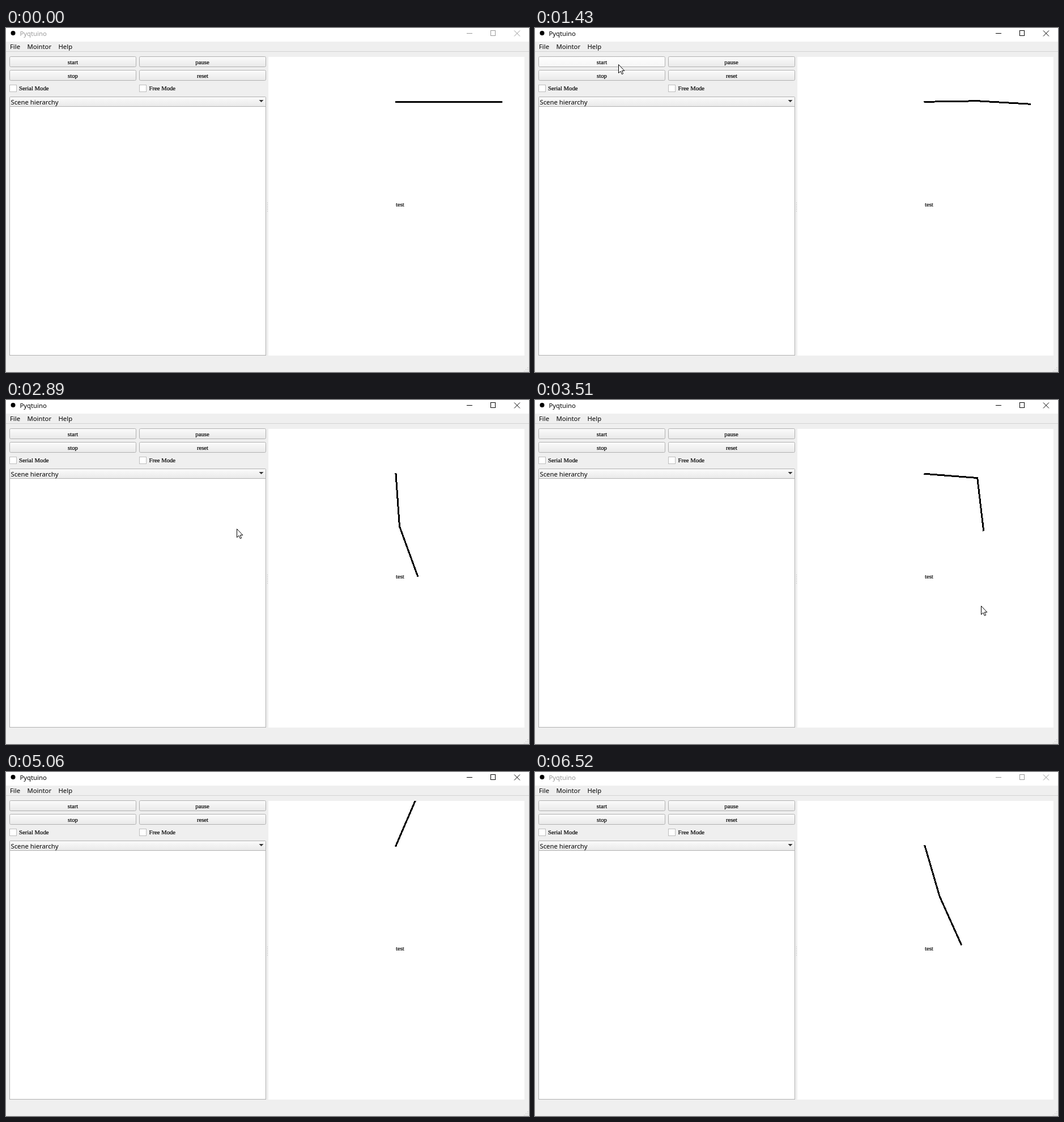
Write an HTML page that moves like this. It is 923 px wide and 607 px high and loops after 6590 ms.

```html
<!DOCTYPE html>
<html lang="en">
<head>
<meta charset="utf-8">
<title>Pyqtuino</title>
<style>
  html, body { margin: 0; width: 100%; height: 100%; overflow: hidden; background: #efefef; }
  svg { display: block; width: 923px; height: 607px; }
  .ui { font: 11.3px "Noto Sans", "Open Sans", sans-serif; }
  .serif { font: 10.7px "Liberation Serif", "Noto Serif", serif; stroke: #000; stroke-width: .2; }
  .mid { text-anchor: middle; }
  .box { stroke: #b0b0b0; }
  .crisp { shape-rendering: crispEdges; }
  #chrome { --ink: #000; }
  #chrome.idle { --ink: #999; }
  #chrome text { fill: var(--ink); }
  #chrome path { fill: none; stroke: var(--ink); }
</style>
</head>
<body>
<svg viewBox="0 0 923 607">
  <defs>
    <linearGradient id="face" x2="0" y2="1">
      <stop stop-color="#fbfbfb"/><stop offset="1" stop-color="#e9e9e9"/>
    </linearGradient>
    <linearGradient id="hover" x2="0" y2="1">
      <stop stop-color="#fff"/><stop offset="1" stop-color="#f5f5f5"/>
    </linearGradient>
    <clipPath id="view"><rect x="463" y="51" width="452" height="527"/></clipPath>
  </defs>

  <rect width="923" height="607" fill="#efefef"/>
  <rect width="923" height="24" fill="#fff"/>
  <circle cx="12.5" cy="9" r="4"/>
  <g id="chrome" class="ui">
    <text x="24.5" y="14">Pyqtuino</text>
    <path class="crisp" d="M813 9.5h10M855.5 4.5h8v9h-8z"/>
    <path d="M897 4.5l10 10M907 4.5l-10 10"/>
  </g>
  <g class="ui">
    <text x="7" y="37">File</text>
    <text x="37.5" y="37">Mointor</text>
    <text x="92.5" y="37">Help</text>
  </g>
  <path class="crisp" d="M0 41.5h923" stroke="#d2d2d2"/>

  <g class="box" fill="url(#face)">
    <rect id="start" x="6.5" y="50.5" width="223" height="18" rx="2"/>
    <rect x="235.5" y="50.5" width="223" height="18" rx="2"/>
    <rect x="6.5" y="74.5" width="223" height="18" rx="2"/>
    <rect x="235.5" y="74.5" width="223" height="18" rx="2"/>
    <rect x="6.5" y="121.5" width="452" height="17" rx="1"/>
    <g fill="#fff">
      <rect x="6.5" y="100.5" width="12" height="12" stroke="#bdbdbd"/>
      <rect x="235.5" y="100.5" width="12" height="12" stroke="#bdbdbd"/>
      <rect x="6.5" y="138.5" width="452" height="439"/>
    </g>
  </g>
  <g class="serif">
    <g class="mid">
      <text x="118" y="63.5">start</text>
      <text x="346.5" y="63.5">pause</text>
      <text x="118" y="87.5">stop</text>
      <text x="347" y="87.5">reset</text>
    </g>
    <text x="23" y="110">Serial Mode</text>
    <text x="252.5" y="110">Free Mode</text>
  </g>
  <text class="ui" x="8.5" y="134.5">Scene hierarchy</text>
  <path d="M446.5 127h8l-4 4z" fill="#333"/>
  <path d="M461.5 308v16" stroke="#bbb" stroke-dasharray="1 2"/>
  <path d="M914 605.5h8M917 602.5h5M920 599.5h2" stroke="#c4c4c4" stroke-dasharray="1.5 1.5"/>

  <rect x="463" y="51" width="452" height="527" fill="#fff"/>
  <text class="serif" x="688" y="314.5">test</text>
  <g clip-path="url(#view)">
    <path id="arms" class="crisp" fill="none" stroke="#000" stroke-width="3"
          stroke-linejoin="round" stroke-linecap="square"/>
  </g>
  <path id="pointer" d="M.5 .5V15.5L4 12.3 6.4 17.6 8.6 16.6 6.3 11.4H10.8Z" fill="#fff" stroke="#000"/>
</svg>
<script>
  const LOOP = 6590, STEP = 77.07, LEN = 93, PIVOT = [688, 130.3];
  const PRESS = 17, RELEASE = 19, LEAVE = 33, BLUR = 85;
  const el = id => document.getElementById(id);

  // Turning points as [step, value]; angles in degrees, clockwise from the right.
  const inner = [[18, 0], [24, -13], [27, 4.6], [36, 92], [38, 86], [45, 18],
                 [55, -164.6], [66, -426.7], [72, -560], [80, -742], [BLUR, -646.3]];
  const outer = [[18, 0], [27, 131.5], [29, 150], [38, 69.9], [45, 85], [55, -38.7],
                 [57, -130], [66, -365], [72, -532], [80, -765], [BLUR, -654.2]];
  const mouseX = [[1, 602], [9, 140], [14, 147], [LEAVE, 147], [38, 407], [45, 780], [55, 822], [63, 864]];
  const mouseY = [[1, 532], [9, 80], [14, 64], [LEAVE, 64], [38, 227], [45, 347], [55, 506], [63, 625]];

  // Smooth curve through the points that never overshoots them.
  function at(keys, k) {
    const rate = i => (keys[i + 1][1] - keys[i][1]) / (keys[i + 1][0] - keys[i][0]);
    const slope = i => {
      if (i === 0 || i === keys.length - 1) return 0;
      const a = rate(i - 1), b = rate(i);
      return a * b > 0 ? 2 * a * b / (a + b) : 0;
    };
    let i = 0;
    while (i < keys.length - 2 && k >= keys[i + 1][0]) i++;
    const [[k0, p], [k1, q]] = keys.slice(i, i + 2), h = k1 - k0;
    const u = Math.min(1, Math.max(0, (k - k0) / h)), v = 1 - u;
    return v * v * (1 + 2 * u) * p + u * u * (1 + 2 * v) * q
         + h * u * v * (v * slope(i) - u * slope(i + 1));
  }

  function joint([x, y], deg) {
    const a = deg * Math.PI / 180;
    return [x + LEN * Math.cos(a), y + LEN * Math.sin(a)];
  }

  function startFill(k) {
    if (k < PRESS || k > LEAVE) return 'url(#face)';
    return k < RELEASE ? '#d8d8d8' : 'url(#hover)';
  }

  function draw(k) {
    const elbow = joint(PIVOT, at(inner, k));
    const tip = joint(elbow, at(outer, k));
    el('arms').setAttribute('d', `M${PIVOT}L${elbow}L${tip}`);

    const x = Math.round(at(mouseX, k)), y = Math.round(at(mouseY, k));
    el('pointer').setAttribute('transform', `translate(${x} ${y})`);
    el('pointer').setAttribute('visibility', k >= 1 ? 'visible' : 'hidden');

    el('chrome').classList.toggle('idle', k < PRESS || k >= BLUR);
    el('start').setAttribute('fill', startFill(k));
  }

  const origin = performance.now();
  function tick() {
    const t = (performance.now() - origin) % LOOP;
    draw(Math.max(0, Math.floor((t - 730) / STEP) + 10));
    requestAnimationFrame(tick);
  }
  draw(0);
  requestAnimationFrame(tick);
</script>
</body>
</html>
```
